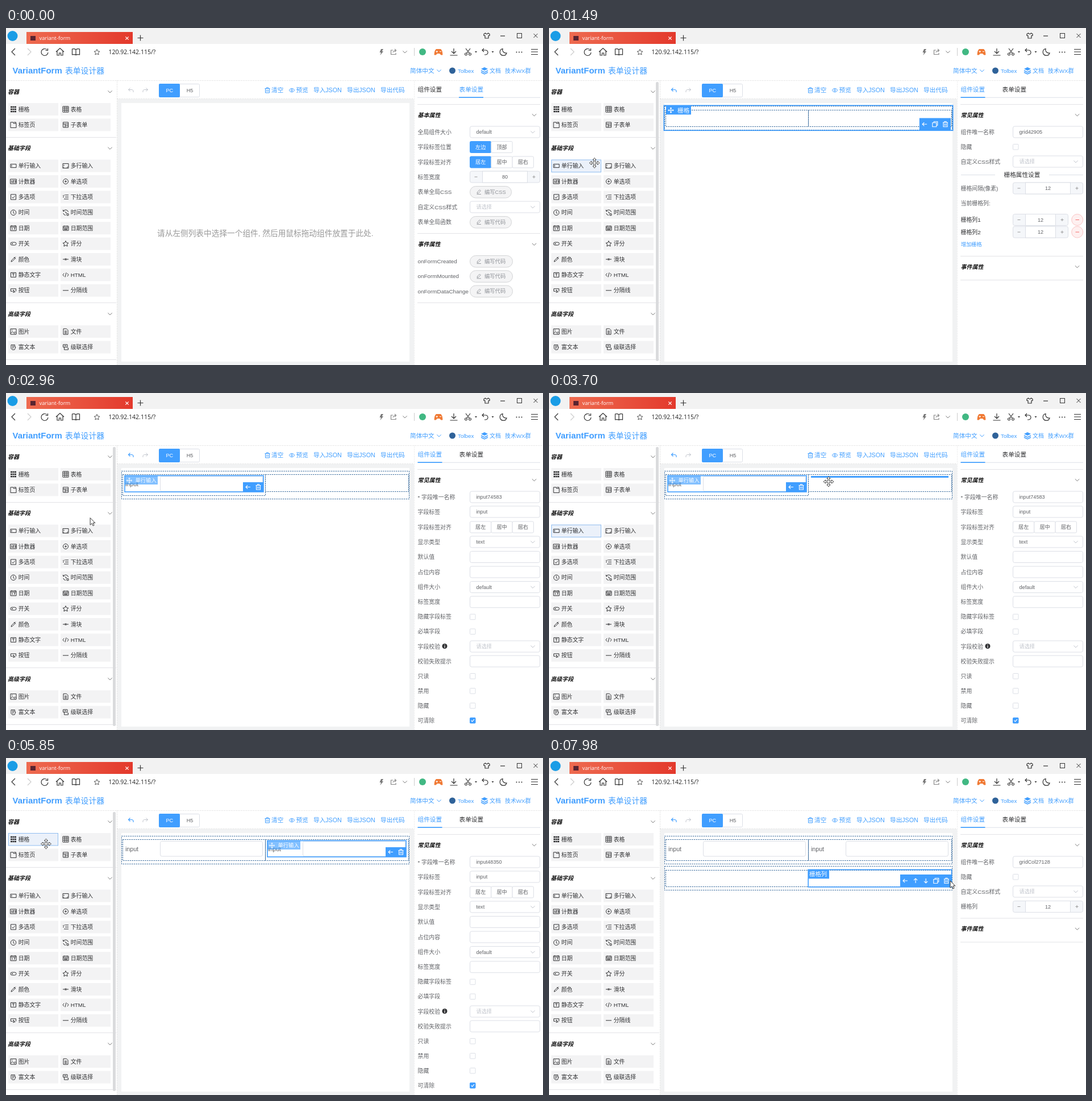
These frames come from a looping animation (945 px wide and 593 px high, 8000 ms). An HTML page:

```html
<!DOCTYPE html>
<html lang="zh">
<head>
<meta charset="utf-8">
<title>VariantForm</title>
<style>
html, body { margin: 0; width: 100%; height: 100%; overflow: hidden; background: #fff; }
svg { display: block; width: 945px; height: 593px; font-family: "Liberation Sans", "Noto Sans CJK SC", "Noto Sans CJK", sans-serif; }
text { white-space: pre; }
.ui { font-family: "Open Sans", "Noto Sans", sans-serif; }
</style>
</head>
<body>
<script>
const LOOP = 8000;
const BLUE = '#409eff', INK = '#303133', GREY = '#606266', LIGHT = '#dcdfe6', FAINT = '#c0c4cc', DASH = '#336699';

// Moments of each drop or click
const DROP1 = 960, GRID1 = 1060, DROP2 = 2560, DROP3 = 3800, DROP4 = 6450, PICK = 7100;

// --- drawing helpers ---
const rect = (x, y, w, h, fill, stroke, r = 0, more = '') =>
  `<rect x="${x}" y="${y}" width="${w}" height="${h}" fill="${fill || 'none'}" stroke="${stroke || 'none'}" rx="${r}" ${more}/>`;
const path = (d, stroke, w = 1, more = '') =>
  `<path d="${d}" fill="none" stroke="${stroke}" stroke-width="${w}" ${more}/>`;
const disc = (x, y, r, fill, stroke = 'none') => `<circle cx="${x}" cy="${y}" r="${r}" fill="${fill}" stroke="${stroke}"/>`;
const text = (x, y, s, size = 9.9, fill = GREY, more = '') =>
  `<text x="${x}" y="${y + size * .36}" font-size="${size}" fill="${fill}" ${more}>${s}</text>`;
const mid = (x, y, s, size, fill) => text(x, y, s, size, fill, 'text-anchor="middle"');
const hr = (y, a, b, color = '#e2e3e6') => path(`M${a} ${y + .5}H${b}`, color);
const timed = (from, to, s) => `<g data-from="${from}" data-to="${to}">${s}</g>`;

const ICONS = {
  grid: 'M-5-4h3M-1.5-4h3M2-4h3M-5 0h3M-1.5 0h3M2 0h3M-5 4h3M-1.5 4h3M2 4h3',
  table: 'M-5-5H5V5H-5ZM-5-2H5M-5 1.5H5M-1.5-5V5M2-5V5',
  tab: 'M-5-4.5H0V-2.5H5V5H-5ZM1-4.5H4.5V-2.5',
  sub: 'M-4.5-4.5H4.5V4.5H-4.5ZM-4.5-1.5H4.5M-1-1.5V4.5M-1 1.5H4.5',
  input: 'M-5-3H5V3H-5ZM-3-1.5V1.5',
  area: 'M-5-4H5V4H-5ZM-3-2V0M2 3.5L4.5 1M-5 4L-3 2',
  num: 'M-5.3-4H5.3V4H-5.3ZM-3-2V2.5M-1.2-1.8H.7V0H-1V2H.9M2.2-1.8H4V2H2.2M2.4 0H4',
  radio: 'M-4.5 0a4.5 4.5 0 1 0 9 0a4.5 4.5 0 1 0-9 0M-1.2 0a1.2 1.2 0 1 0 2.4 0a1.2 1.2 0 1 0-2.4 0M-.5 0H.5',
  check: 'M-4.5-4.5H4.5V4.5H-4.5ZM-2.5 0L-.7 2L2.8-2',
  select: 'M-1-3.5H5M-1 0H5M-3 3.5H5M-5-3L-3.8-1.8L-2-4M-5 0H-3',
  clock: 'M-4.7 0a4.7 4.7 0 1 0 9.4 0a4.7 4.7 0 1 0-9.4 0M0-3V.5L2 1.8',
  range: 'M-4-2.5A4.6 4.6 0 0 1 4.5-1M-4.5-5V-2.5H-2M-4.2 1A4.6 4.6 0 0 0 0 4.7M0-2V.5H2M2 2H5V5H2Z',
  date: 'M-5-4H5V4.5H-5ZM-5-2H5M-2-.5V3M1-.3H2.7L1.5 3M-3-5V-3.5M3-5V-3.5',
  dates: 'M-4.5-3.5H5V4H-4.5ZM-4.5-1H5M-3 1H3.5M-3 2.5H3M-2-4.5V-2.5M2.5-4.5V-2.5',
  toggle: 'M-2.5-2.5H2.5a2.5 2.5 0 0 1 0 5H-2.5a2.5 2.5 0 0 1 0-5M-3 0H-1M-2-1V1',
  star: 'M0-5L1.5-1.7L5-1.3L2.4 1L3.1 4.5L0 2.8L-3.1 4.5L-2.4 1L-5-1.3L-1.5-1.7Z',
  pen: 'M-4 4.2L-3.3 2L1.5-2.8L3 -1.3L-1.8 3.5ZM1-4L4.2-.8M2.5-2.8L4-4.3',
  slide: 'M-5 0H5M-1.5-1H1.5M-1.5 1H1.5',
  label: 'M-4.5-4H4.5V4H-4.5ZM-2.2-2H2.2M0-2V2.5',
  code: 'M-2.7-2.8L-5 0L-2.7 2.8M2.7-2.8L5 0L2.7 2.8M1-4L-1 4',
  btn: 'M-1.5 1.5H-4.5V-3H4.5V1.5M0-1V4L1.2 2.6L3 3Z',
  line: 'M-5 0H5',
  pic: 'M-5-4.8H5V4.8H-5ZM-5 3L-1.5 0L3 4.5M1 2L3 .5L5 2.5M-3-2.5H-1.5',
  file: 'M-4-5H1.5L4-2.5V5H-4ZM-2-1H2M-2 1H2M-2 3H2',
  rich: 'M-4-4H2.5V0M-4-4V2.5L-2 4.5H2L4 0L2.5-1M-2-2H1M-2 0H1M-2 2H0',
  casc: 'M-4.5-4.5H3V0H-4.5ZM-2.5 0V4.5H4.5V1.5H3M-2.5-2.5H1',
  down: 'M-3.6-1.7L0 1.9L3.6-1.7',
  undo: 'M-1.5-4L-4.5-1L-1.5 2M-4.5-1H1.5Q4.5-.8 4 3.5',
  redo: 'M1.5-4L4.5-1L1.5 2M4.5-1H-1.5Q-4.5-.8-4 3.5',
  trash: 'M-4.5-3H4.5M-1.5-3V-4.7H1.5V-3M-3.5-3V4.5H3.5V-3M-1.2-1V2.7M1.2-1V2.7',
  eye: 'M-5 0Q0-6.5 5 0Q0 6.5-5 0ZM-1.4 0a1.4 1.4 0 1 0 2.8 0a1.4 1.4 0 1 0-2.8 0',
  move: 'M-4.5 0H4.5M0-4.5V4.5M-3-1.4L-4.5 0L-3 1.4M3-1.4L4.5 0L3 1.4M-1.4-3L0-4.5L1.4-3M-1.4 3L0 4.5L1.4 3',
  left: 'M4 0H-4M-.8-3.2L-4 0L-.8 3.2',
  up: 'M0 4V-4M-3.2-.8L0-4L3.2-.8',
  dn: 'M0-4V4M-3.2 .8L0 4L3.2 .8',
  copy: 'M-4.5-2.5H2.5V4.5H-4.5ZM-2-2.5V-4.5H4.5V2H2.5',
  edit: 'M-3 2.5L-2.5 .2L1.5-3.8L3.3-2L-.7 2ZM-3.5 4H4',
  cross: 'M-3.5-3.5L3.5 3.5M3.5-3.5L-3.5 3.5',
  plus: 'M-5 0H5M0-5V5'
};
const icon = (name, x, y, color = INK, w = 1) => path(ICONS[name], color, w, `transform="translate(${x} ${y})"`);

// --- browser window ---
function chrome() {
  const dark = '#333';
  const at = (x, d, color = dark, y = 42) => path(d, color, 1.2, `transform="translate(${x} ${y})"`);
  return rect(0, 0, 945, 28, '#f2f2f2') + disc(11.5, 14, 9, '#1a9de6') +
    rect(36, 7, 187, 21, 'url(#tab)') + rect(43, 14, 9, 8, '#5a2430') +
    text(58.5, 18, 'variant-form', 9.4, '#fff', 'class="ui"') +
    at(213, 'M-2.7-2.7L2.7 2.7M2.7-2.7L-2.7 2.7', '#fff', 18) + icon('plus', 236.5, 17.5, dark, 1.2) +
    at(846, 'M-2.5-4.5L-5-3V0H-3V4.5H3V0H5V-3L2.5-4.5L1-3H-1Z', dark, 13.5) +
    at(874, 'M-4 0H4', dark, 14) + rect(899.5, 9.5, 8, 8, '', dark) + icon('cross', 932, 13.5, dark) +
    at(13, 'M3-6L-3 0L3 6') + at(41, 'M-3-6L3 0L-3 6', '#ccc') +
    at(68, 'M4-4A6 6 0 1 0 6 1M5.5-6V-2.5H1.5') + at(95, 'M-7 0L0-6.5L7 0M-5-1.5V6H-1.5V2H1.5V6H5V-1.5') +
    at(123, 'M0-4Q-3-6-6.5-5V5Q-3 4 0 5.5Q3 4 6.5 5V-5Q3-6 0-4V5') + icon('star', 160, 42.5, '#555') +
    text(180.5, 42.5, '120.92.142.115/?', 10.5, '#222', 'class="ui"') +
    `<path d="M660 37H664L661.5 41H664L658.5 48L660 43H657.5Z" fill="#777"/>` +
    at(682, 'M-1-3H-4.5V4.5H4V2M-1 1Q0-2.5 4-2.5M2-5L4.5-2.5L2 0', '#888') + icon('down', 702, 42, '#777') +
    path('M718.5 35V49', '#ccc') + disc(733, 42, 6, '#41b883') +
    `<path d="M757 37H765Q768 39 768.5 47Q766 49 763 45H759Q756 49 753.5 47Q754 39 757 37Z" fill="#f07a35"/>` +
    path('M756.5 41.5H760M758.2 39.8V43.3M763 41.5H766', '#fff') +
    at(788, 'M0-6V3M-4-1L0 3L4-1M-6.5 6H6.5') +
    at(813, 'M-4-6L3 3M4-6L-3 3M-5.5 4a2 2 0 1 0 4 0a2 2 0 1 0-4 0M1.5 4a2 2 0 1 0 4 0a2 2 0 1 0-4 0') +
    at(843, 'M-2-6L-5-3L-2 0M-5-3H1A4 4 0 0 1 1 5H-1') +
    `<path d="M825 41h4l-2 2.5ZM854.5 41h4l-2 2.5Z" fill="#333"/>` +
    at(875, 'M-1-5.5A6 6 0 1 0 6 2A6 6 0 0 1-1-5.5Z') +
    [-4.5, 0, 4.5].map(d => disc(903 + d, 42.5, 1, dark)).join('') + at(930, 'M-6-4.5H6M-6 0H6M-6 4.5H6');
}

// --- sidebar ---
const ITEMS = [];
const group = (y, list) => list.split(' ').forEach((entry, i) => {
  const [name, label] = entry.split(':');
  ITEMS.push({ name, label, x: i % 2 ? 96 : 4, y: y + (i >> 1) * 27.4 });
});
group(132, 'grid:栅格 table:表格 tab:标签页 sub:子表单');
group(231.6, 'input:单行输入 area:多行输入 num:计数器 radio:单选项 check:多选项 select:下拉选项 clock:时间 range:时间范围 ' +
  'date:日期 dates:日期范围 toggle:开关 star:评分 pen:颜色 slide:滑块 label:静态文字 code:HTML btn:按钮 line:分隔线');
group(523.2, 'pic:图片 file:文件 rich:富文本 casc:级联选择');

const face = it => icon(it.name, it.x + 9, it.y + 11, INK, it.name === 'grid' ? 2.6 : 1) + text(it.x + 17.7, it.y + 11, it.label, 9.9, INK);
const hot = it => rect(it.x + .5, it.y + .5, 87, 21.5, '#ebf1fa', '#8fbdf0') + face(it);
const head = (x, y, s, cx) => text(x, y, s, 10, '#111', 'font-weight="bold" font-style="italic"') + icon('down', cx, y, '#777');

function sidebar() {
  return ITEMS.map((it, i) => rect(it.x, it.y, 88, 22, '#f3f3f4') + face(it) + `<g id="hot${i}">${hot(it)}</g>`).join('') +
    head(3, 112, '容器', 183) + head(3, 211.5, '基础字段', 183) + head(3, 503, '高级字段', 183) +
    hr(192, 0, 194) + hr(483, 0, 194) + hr(583, 0, 194) +
    path('M195.5 93V593', '#ccc', 1, 'stroke-dasharray="1 2"') +
    timed(DROP1, DROP4, rect(188, 95, 5, 491, '#dadbdd', '', 2));
}

// --- header and toolbar ---
function header() {
  const act = (x, s) => text(x, 109.5, s, 10.65, BLUE);
  return text(11.5, 75, 'VariantForm', 14.95, BLUE, 'font-weight="bold"') + text(104, 75, '表单设计器', 13.8, BLUE) +
    text(711, 75, '简体中文', 10.65, BLUE) + icon('down', 762, 75, BLUE) +
    disc(785.5, 75, 5.5, '#2f6299') + text(795, 75, 'Tolbex', 9.9, BLUE) +
    `<path d="M842 69l6 3l-6 3l-6-3Z" fill="${BLUE}"/>` + path('M836 75L842 78L848 75M836 78L842 81L848 78', BLUE, 1.5) +
    text(851, 75, '文档', 9.9, BLUE) + text(878, 75, '技术WX群', 9.9, BLUE) +
    path('M0 92.5H945M196 124.5H718', '#ccc', 1, 'stroke-dasharray="1 2"') +
    timed(0, DROP1, icon('undo', 220, 109.5, FAINT)) + timed(DROP1, LOOP, icon('undo', 220, 109.5, BLUE, 1.2)) +
    icon('redo', 245, 109.5, FAINT) +
    rect(269.5, 98.5, 71, 23, '#fff', LIGHT, 2) + rect(269, 98, 37, 24, BLUE, '', 2) +
    mid(287.7, 110, 'PC', 9.1, '#fff') + mid(323.5, 110, 'H5', 9.1, GREY) +
    icon('trash', 460, 109.5, BLUE) + act(467, '清空') + icon('eye', 503, 109.5, BLUE) + act(510.5, '预览') +
    act(541, '导入JSON') + act(600, '导出JSON') + act(659, '导出代码');
}

// --- canvas ---
const dashed = (x, y, w, h) => rect(x + .5, y + .5, w, h, '', DASH, 0, 'stroke-dasharray="2.3 1.5"');
const outline = (x, y, w, h) => rect(x, y, w, h, '', BLUE, 0, 'stroke-width="1.6"');
const bar = (x, y, w, h = 3) => rect(x, y, w, h, BLUE);
const tools = (x, y, w, h, names, gap, pad) => rect(x, y, w, h, BLUE) +
  names.split(' ').map((n, i) => icon(n, x + pad + i * gap, y + h / 2, '#fff', 1.1)).join('');

const cells = (y, h1, h2) => dashed(205, y, 251, h1) + dashed(456, y, 252, h2);
const emptyGrid = y => dashed(203, y, 506, 42) + cells(y + 7, 29, 29);
function gridBox(y, names) {
  const n = names.split(' ').length, w = n * 18.4;
  return emptyGrid(y) + outline(202.3, y - .7, 508.4, 44) + rect(206, y, 44, 15.3, BLUE) +
    icon('move', 214.5, y + 7.7, '#fff', 1.1) + text(226, y + 7.7, '栅格', 10.65, '#fff') +
    tools(707 - w, y + 21.5, w, 21.5, names, 18.2, 9.3);
}
const field = x => text(x + 2, 160, 'input', 10.65, GREY) + rect(x + 63.5, 146.5, 180, 26.5, '#fff', LIGHT, 3);
const picked = x => field(x) + outline(x + 1, 145.5, 244, 28.5) +
  `<g opacity=".65">${rect(x + 1, 146, 58, 15, BLUE)}</g>` +
  icon('move', x + 9, 154, '#fff') + text(x + 19.5, 154, '单行输入', 9.3, '#fff') +
  tools(x + 209, 157, 36, 17, 'left trash', 18, 9);

function stage() {
  const frame1 = dashed(203, 137, 506, 49), full = frame1 + cells(143, 37, 37);
  return rect(196, 125, 522, 468, '#f1f2f3') + rect(203, 132, 507, 455, '#fff') +
    timed(0, DROP1, text(266, 361, '请从左侧列表中选择一个组件, 然后用鼠标拖动组件放置于此处.', 13.68, '#999')) +
    timed(GRID1, DROP2, gridBox(137, 'left copy trash')) +
    timed(DROP2, DROP3, frame1 + cells(143, 37, 30) + picked(208)) +
    timed(DROP3, DROP4, full + field(208) + picked(459)) +
    timed(DROP4, LOOP, full + field(208) + field(459)) +
    timed(DROP4, PICK, gridBox(190, 'left up dn copy trash')) +
    timed(PICK, LOOP, emptyGrid(190) + outline(456.2, 196.5, 252.3, 30.5) +
      rect(456, 197, 37, 15.3, BLUE) + text(458, 204.7, '栅格列', 10.4, '#fff') +
      tools(618, 205, 90, 22, 'left up dn copy trash', 18.1, 9)) +
    timed(450, DROP1, bar(208, 137, 496)) + timed(1850, 2200, bar(208, 177, 444, 4)) +
    timed(2200, DROP2, bar(210, 146, 243)) + timed(3640, DROP3, bar(461, 146, 242)) +
    timed(6200, DROP4, bar(208, 188, 496));
}

// --- settings panel ---
const label = (y, s, color) => text(724.5, y, s, 9.9, color);
const box = (y, s = '', color = GREY) => rect(816.5, y - 10, 123, 20, '#fff', LIGHT, 3) + text(827.5, y, s, 9.15, color);
const pick = (y, s, color) => box(y, s, color) + icon('down', 927, y, FAINT);
const tick = (y, on) => rect(816.5, y - 4.5, 9.5, 9.5, on ? BLUE : '#fff', on ? BLUE : LIGHT, 1) +
  (on ? path(`M818.5 ${y + .2}l2 2l3.5-4`, '#fff', 1.2) : '');
const seg = (y, names, on) => names.split(' ').map((s, i) =>
  rect(816.5 + i * 37.3, y - 10, 37.3, 20, i === on ? BLUE : '#fff', i === on ? BLUE : LIGHT, 2) +
  mid(835.2 + i * 37.3, y, s, 9.15, i === on ? '#fff' : GREY)).join('');
const count = (y, v, w = 124) => rect(816.5, y - 10, w - 1, 20, '#f5f7fa', LIGHT, 3) + rect(838.5, y - 10, w - 45, 20, '#fff', LIGHT) +
  path(`M824.5 ${y}h5M${w + 802.5} ${y}h5m-2.5-2.5v5`, '#999') + mid(816 + w / 2, y, v, 9.15, GREY);
const pill = (y, s, w = 76) => rect(816.5, y - 10, w - 1, 20.5, '#f4f4f5', '#d3d4d6', 10.2) +
  icon('edit', 832, y, '#909399', .9) + text(842, y, s, 9.3, '#909399');
const choose = y => pick(y, '请选择', FAINT);
const row = (y, s, control) => label(y, s) + control;
const firstHead = s => hr(134, 724, 940) + head(724.5, 153, s, 929.5);
const events = y => hr(y, 724, 940) + head(724.5, y + 19, '事件属性', 929.5) + hr(y + 42, 724, 940);
const common = id => firstHead('常见属性') + row(183, '组件唯一名称', box(183, id)) + row(209, '隐藏', tick(209)) +
  row(235, '自定义CSS样式', choose(235));

const formPanel = () => firstHead('基本属性') + row(183, '全局组件大小', pick(183, 'default')) +
  row(209.5, '字段标签位置', seg(209.5, '左边 顶部', 0)) + row(236, '字段标签对齐', seg(236, '居左 居中 居右', 0)) +
  row(262, '标签宽度', count(262, 80)) + row(288.5, '表单全局CSS', pill(288.5, '编写CSS', 74)) +
  row(315, '自定义CSS样式', choose(315)) + row(341.5, '表单全局函数', pill(341.5, '编写代码', 74)) +
  hr(361, 724, 940) + head(724.5, 380.5, '事件属性', 929.5) +
  ['Created', 'Mounted', 'DataChange'].map((s, i) => row(410.5 + i * 26.3, 'onForm' + s, pill(410.5 + i * 26.3, '编写代码'))).join('') +
  hr(483, 724, 940);

const gridPanel = id => common(id) + hr(258, 725, 785, LIGHT) + hr(258, 880, 940, LIGHT) +
  text(800.5, 258, '栅格属性设置', 10.65, INK) + row(282, '栅格间隔(像素)', count(282, 12)) + label(308, '当前栅格列:') +
  [1, 2].map(n => {
    const y = 315.9 + n * 21.6;
    return label(y, '栅格列' + n, INK) + count(y, 12, 98) + disc(929.7, y, 10, '#fef0f0', '#fbc4c4') + path(`M926.5 ${y}h6.5`, '#f56c6c');
  }).join('') + text(725, 381, '增加栅格', 9.2, BLUE) + events(401);

const inputPanel = id => firstHead('常见属性') + row(183, '* 字段唯一名称', box(183, id)) + row(209, '字段标签', box(209, 'input')) +
  row(236, '字段标签对齐', seg(236, '居左 居中 居右')) + row(262, '显示类型', pick(262, 'text')) +
  row(288.5, '默认值', box(288.5)) + row(315, '占位内容', box(315)) + row(341.5, '组件大小', pick(341.5, 'default')) +
  row(367.7, '标签宽度', box(367.7)) + row(393.7, '隐藏字段标签', tick(393.7)) + row(419.5, '必填字段', tick(419.5)) +
  row(446, '字段校验', choose(446)) + disc(772, 445.5, 4.5, INK) + path('M772 444.7V448.5M772 442.5V443.7', '#fff', 1.2) +
  row(472, '校验失败提示', box(472)) +
  ['只读', '禁用', '隐藏', '可清除'].map((s, i) => row(498 + i * 26, s, tick(498 + i * 26, i === 3))).join('');

const columnPanel = id => common(id) + row(261.5, '栅格列', count(261.5, 12)) + events(281.5);

function panel() {
  const tabs = (a, b) => text(724.5, 108, '组件设置', 10.65, a) + text(797.5, 108, '表单设置', 10.65, b);
  return rect(718, 93, 227, 500, '#fff') + path('M718.5 93V593', '#ddd', 1, 'stroke-dasharray="1 2"') +
    timed(0, DROP1, tabs(INK, BLUE)) + timed(DROP1, LOOP, tabs(BLUE, INK)) +
    rect(724, 121.7, 216, 1.3, '#e4e7ed') + `<g id="ink">${rect(0, 121.3, 43, 1.7, BLUE)}</g>` +
    timed(0, DROP1, formPanel()) + timed(DROP1, DROP2, gridPanel('grid42905')) +
    timed(DROP2, DROP3, inputPanel('input74583')) + timed(DROP3, DROP4, inputPanel('input48350')) +
    timed(DROP4, PICK, gridPanel('grid62295')) + timed(PICK, LOOP, columnPanel('gridCol27128'));
}

// --- pointer ---
const fourWay = 'M0-9L3-5.5H1.2V-1.2H5.5V-3L9 0L5.5 3V1.2H1.2V5.5H3L0 9L-3 5.5H-1.2V1.2H-5.5V3L-9 0L-5.5-3V-1.2H-1.2V-5.5H-3Z';
const forbid = 'M-6 0a6 6 0 1 0 12 0a6 6 0 1 0-12 0M-4-4L4 4';
const pointer = () => `<g id="pointer">
  <path id="arrow" d="M0 0V12.5L3 9.8L5 14L7 13L5 9H8.8Z" fill="#fff" stroke="#333"/>
  <path id="move" d="${fourWay}" fill="#fff" stroke="#333" stroke-width=".9"/>
  <g id="no">${path(forbid, '#222', 4)}${path(forbid, '#e8d21c', 2)}</g></g>`;

document.body.innerHTML = `<svg viewBox="0 0 945 593" xmlns="http://www.w3.org/2000/svg">
  <defs><linearGradient id="tab"><stop stop-color="#ee6b50"/><stop offset="1" stop-color="#e3392c"/></linearGradient></defs>
  ${chrome()}${stage()}${sidebar()}${header()}${panel()}
  <g opacity=".6"><g id="ghost0">${hot({ ...ITEMS[0], x: 0, y: 0 })}</g><g id="ghost4">${hot({ ...ITEMS[4], x: 0, y: 0 })}</g></g>
  ${pointer()}</svg>`;

// --- motion ---
const ROUTE = [ // time, x, y
  [70, 60, 146], [200, 90, 150], [450, 220, 165], [630, 265, 168], [1020, 268, 167], [1080, 268, 167],
  [1300, 130, 225], [1560, 62, 242], [1620, 103, 226], [1800, 180, 185], [2100, 260, 167], [2360, 322, 160],
  [2600, 326, 160], [2900, 170, 215], [3240, 48, 241], [3310, 75, 236], [3480, 339, 203], [3700, 492, 156],
  [3800, 492, 156], [4000, 180, 250], [4110, 62, 268], [4180, 62, 260], [4570, 62, 246], [4990, 62, 246],
  [5250, 120, 240], [5500, 125, 165], [5780, 70, 151], [5850, 70, 151], [6000, 140, 170], [6300, 400, 220],
  [6450, 442, 236], [6710, 442, 236], [6900, 560, 222], [7100, 600, 218], [7510, 699, 215], [7580, 706, 214],
  [7850, 706, 214], [7980, 706, 216]
];
const DRAGS = [ // start, end, item, ghost gone
  [80, DROP1, 0, DROP1], [1570, DROP2, 4, DROP2], [3250, DROP3, 4, 3640], [5860, DROP4, 0, DROP4]
];

function along(t) {
  const i = ROUTE.findIndex(p => p[0] > t);
  if (i < 1) return (i ? ROUTE[ROUTE.length - 1] : ROUTE[0]).slice(1);
  const a = ROUTE[i - 1], b = ROUTE[i], k = (t - a[0]) / (b[0] - a[0]);
  return [a[1] + (b[1] - a[1]) * k, a[2] + (b[2] - a[2]) * k];
}

const $ = id => document.getElementById(id);
const show = (el, on) => { el.style.display = on ? '' : 'none'; };
const place = (el, x, y) => el.setAttribute('transform', `translate(${x} ${y})`);
const scenes = [...document.querySelectorAll('[data-from]')].map(el => [el, +el.dataset.from, +el.dataset.to]);

function render(t) {
  scenes.forEach(([el, a, b]) => show(el, t >= a && t < b));
  const k = Math.min(1, Math.max(0, (t - 1020) / 280));
  place($('ink'), 797 - 72.5 * k * k * (3 - 2 * k), 0);

  const [x, y] = along(t), live = t >= 70;
  const drag = DRAGS.find(d => t >= d[0] && t < d[1]);
  const over = ITEMS.findIndex(it => x >= it.x && x < it.x + 88 && y >= it.y && y < it.y + 22);
  const active = drag ? drag[2] : live ? over : -1;
  ITEMS.forEach((it, i) => show($('hot' + i), i === active));

  for (const i of [0, 4]) {
    show($('ghost' + i), drag && drag[2] === i && t < drag[3]);
    place($('ghost' + i), x - 44, y - 8);
  }
  const kind = drag ? (x < 265 ? 'no' : 'move') : over >= 0 ? 'move' : 'arrow';
  ['arrow', 'move', 'no'].forEach(id => show($(id), live && id === kind));
  place($('pointer'), x, y);
}

const start = performance.now();
function loop() {
  render((performance.now() - start) % LOOP);
  requestAnimationFrame(loop);
}
loop();
</script>
</body>
</html>
```
